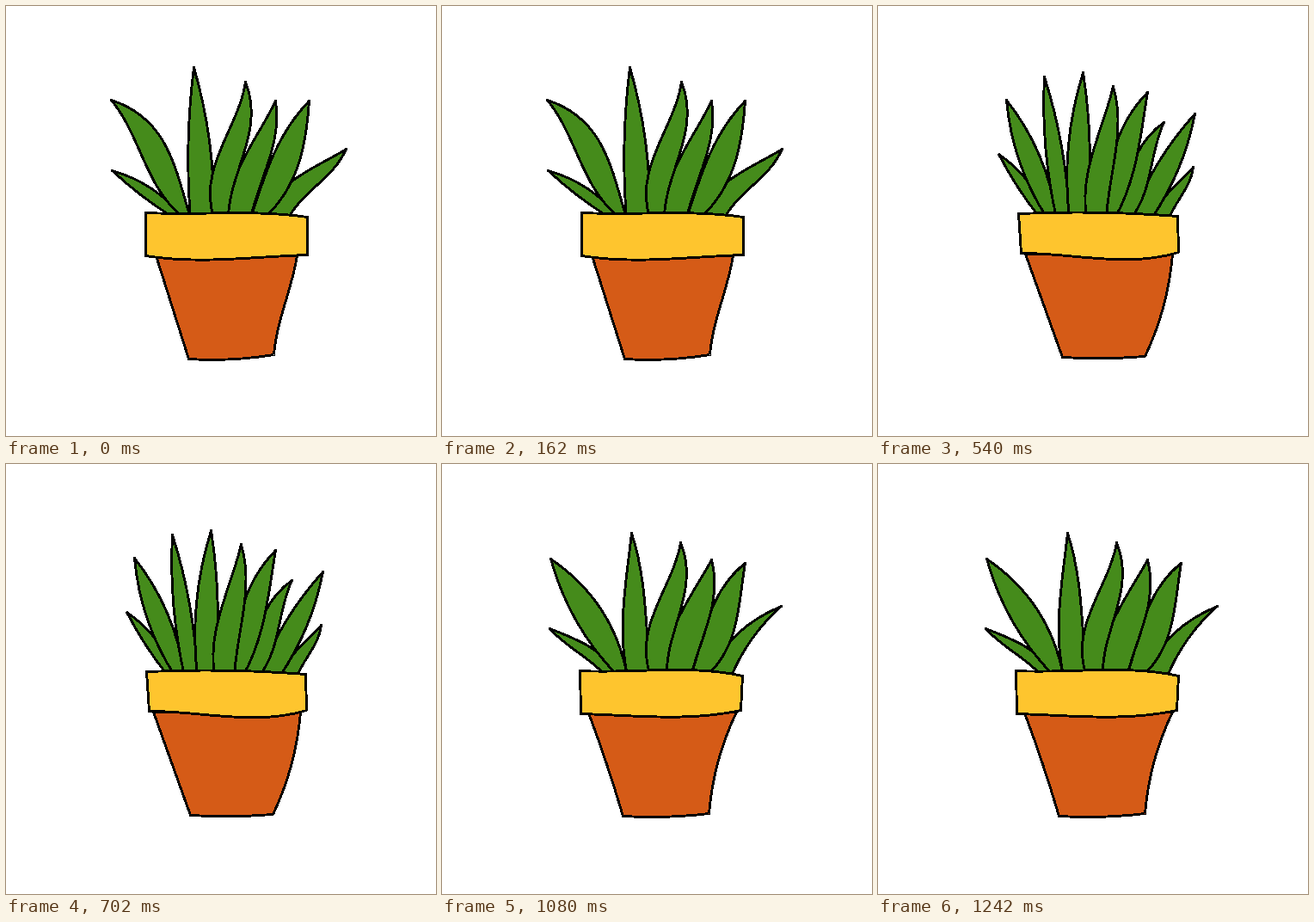
Animation, 500 px wide and 500 px high, one loop 1350 ms. Source, as an HTML page:

```html
<!DOCTYPE html>
<html lang="en">
<head>
<meta charset="utf-8">
<title>Potted plant</title>
<style>
  html, body { margin: 0; width: 100%; height: 100%; overflow: hidden; background: #fff; }
  svg { display: block; width: 100%; height: 100%; }
  path { stroke: #000; stroke-width: 2.9; stroke-linejoin: round; }
</style>
</head>
<body>
<svg id="stage" viewBox="-.5 -.5 500 500" shape-rendering="crispEdges"></svg>
<script>
const GREEN = '#458b1b', YELLOW = '#fec52e', ORANGE = '#d55b17';
const HOLD = 270, FLOOR = 246;
const stage = document.getElementById('stage');

// Cubic from a to b that lies p and q pixels outside the chord at its thirds
function edge([ax, ay], [bx, by], p, q) {
  const dx = bx - ax, dy = by - ay, len = Math.hypot(dx, dy);
  const at = (t, off) => `${ax + dx * t + dy / len * off} ${ay + dy * t - dx / len * off}`;
  return `C${at(1 / 3, 3 * p - 1.5 * q)} ${at(2 / 3, 3 * q - 1.5 * p)} ${bx} ${by}`;
}

// Clockwise corners [x, y, bow, bend]: bow swells the next edge, bend makes it an S
function outline(fill, corners) {
  const d = corners.map((c, i) => {
    const [, , bow = 0, bend = 0] = c;
    return edge(c, corners[(i + 1) % corners.length], bow + bend, bow - bend);
  });
  return `<path fill="${fill}" d="M${corners[0].slice(0, 2)}${d.join('')}Z"/>`;
}

// Leaves [tip x, tip y, left bow, right bow, bend] stand side by side on the bases
function pose({ bases, leaves, pot, rim }) {
  const mid = (leaves.length - 1) / 2;
  const outsideIn = leaves.map((_, i) => i)
    .sort((a, b) => Math.abs(b - mid) - Math.abs(a - mid));
  const foliage = outsideIn.map(i => {
    const [x, y, left, right, bend] = leaves[i];
    return outline(GREEN, [[bases[i], FLOOR, left, bend], [x, y, right, bend], [bases[i + 1], FLOOR]]);
  });
  return foliage.join('') + outline(ORANGE, pot) + outline(YELLOW, rim);
}

const poses = [
  pose({
    bases: [195, 206, 214, 241, 258, 284, 300, 328],
    leaves: [
      [123, 191, 2, 7, 0], [122, 109, 4, 20, 3], [218, 71, 4, 6, 0], [278, 88, 9, 8, 4],
      [313, 110, 8, 6, 2], [352, 110, 8, 13, -1], [395, 166, 10, 1, 2]
    ],
    pot: [[174, 290], [338, 290, -1, 1], [311, 405, 2.5], [212, 410]],
    rim: [[162, 240, 2, -1], [350, 245], [350, 289, 4, -1], [162, 290]]
  }),
  pose({
    bases: [186, 201, 213, 235, 256, 284, 296, 322],
    leaves: [
      [122, 207, -6, 17, -1], [145, 102, 13, 1, -5], [203, 81, 1, 8, 1], [271, 84, 9, 5, 4],
      [296, 88, 2, 7, 1], [349, 107, 15, 6, -2], [384, 145, 9, 7, -1]
    ],
    pot: [[171, 290], [331, 290, -1.5], [309, 406, 1], [207, 411, 3]],
    rim: [[161, 241, 4], [351, 244], [350, 289, 4.5, -2.5], [159, 290]]
  }),
  pose({
    bases: [188, 196, 207, 222, 242, 265, 275, 294, 318, 338],
    leaves: [
      [140, 172, 2, 7, 0], [149, 109, 8, 9, 0], [193, 82, 5, 5, 0], [238, 77, 8, 5, 0],
      [273, 93, 7, 6, 2], [313, 100, 14, 6, -1], [332, 135, 9, 3, -2], [368, 125, 6, 6, 0],
      [366, 187, 3, 2, 1]
    ],
    pot: [[171, 288], [342, 288, 5], [310, 407, 1.5], [214, 408]],
    rim: [[163, 241, 2.5], [348, 244], [349, 286, 6, 2], [166, 287]]
  }),
  pose({
    bases: [185, 195, 207, 221, 241, 259, 285, 304, 326],
    leaves: [
      [151, 173, -5, 10, 1], [178, 99, 6, 4, 1], [195, 87, 2, 7, -1], [252, 83, 14, 3, 0],
      [278, 97, 10, -1, -3], [304, 88, 11, 4, -1], [371, 99, 22, -6, -2], [366, 163, 12, 3, 2]
    ],
    pot: [[179, 287], [337, 288, 1.5], [300, 409, 0.5], [213, 405, 1]],
    rim: [[162, 239, 2, -1], [351, 247], [353, 289, 1], [162, 286]]
  }),
  pose({
    bases: [190, 204, 215, 242, 261, 289, 307, 336],
    leaves: [
      [125, 191, 0, 8, -1], [126, 110, 9, 15, 0], [220, 80, 6, 4, 1], [277, 91, 10, 7, 4],
      [313, 111, 10, 8, 2], [352, 115, 10, 11, -2], [394, 165, 10, -5, 0]
    ],
    pot: [[170, 289], [342, 288, -5], [310, 406, 2], [210, 409, -1]],
    rim: [[160, 240, 3.5, -1.5], [349, 246], [347, 286, 5, 1], [161, 290]]
  })
];

let shown = -1;
const start = performance.now();

function tick() {
  const i = Math.floor((performance.now() - start) / HOLD) % poses.length;
  if (i !== shown) stage.innerHTML = poses[shown = i];
  requestAnimationFrame(tick);
}
tick();
</script>
</body>
</html>
```
